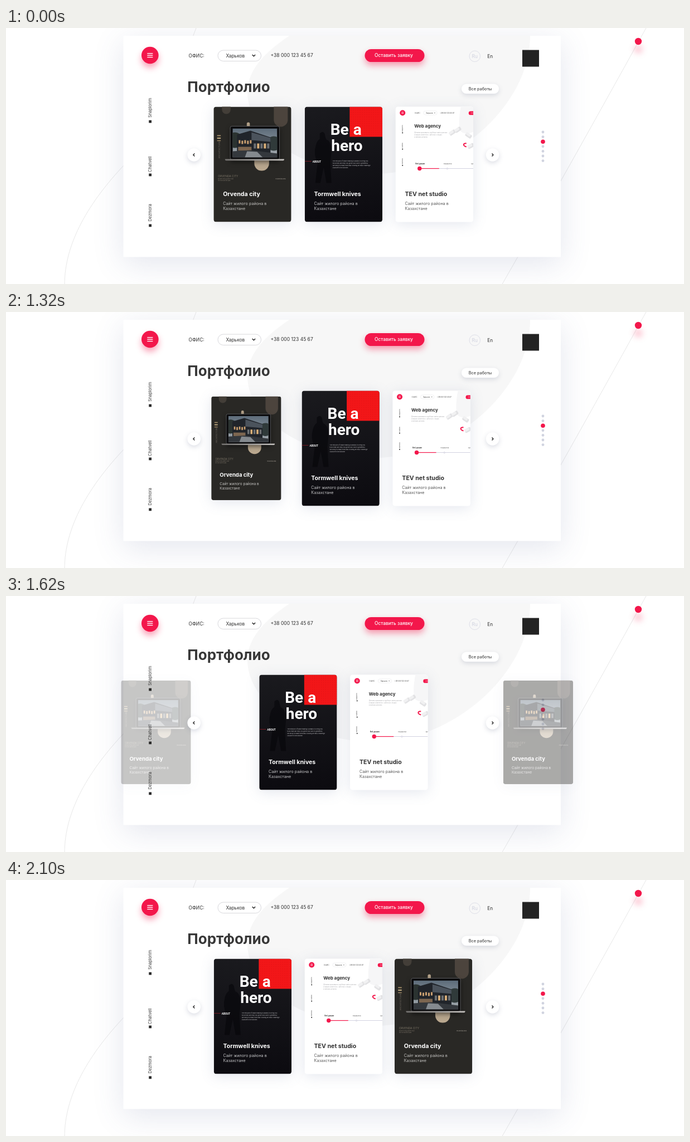
Recreate the animation shown at these times as an HTML page with a canvas. Size 1216 px wide and 460 px high, loop 3.6 s.

```html
<!DOCTYPE html>
<html lang="ru">
<head>
<meta charset="utf-8">
<title>Портфолио</title>
<style>
html, body { margin: 0; width: 100%; height: 100%; overflow: hidden; background: #fff; }
canvas { display: block; width: 1216px; height: 460px; }
</style>
</head>
<body>
<canvas id="stage"></canvas>
<script>
const W = 1216, H = 460, LOOP = 3600, STEP = 30;
const CARD_W = 139.3, CARD_H = 207, CARD_Y = 245;
const RED = '#f3174b', INK = '#2f2f2f', PHONE = '+38 000 123 45 67';
const dpr = window.devicePixelRatio || 1;

function setup(canvas) {
  canvas.width = W * dpr;
  canvas.height = H * dpr;
  const c = canvas.getContext('2d');
  c.scale(dpr, dpr);
  return c;
}
const main = setup(document.getElementById('stage'));
const layer = setup(document.createElement('canvas'));
let g = main;

// Drawing helpers
function text(s, x, y, size, color, weight = 400, font = 'Inter', align = 'left') {
  g.font = `${weight} ${size}px ${font}, sans-serif`;
  g.fillStyle = color;
  g.textAlign = align;
  g.fillText(s, x, y);
}
function vtext(s, x, y, size, color) {
  g.save();
  g.translate(x, y);
  g.rotate(-Math.PI / 2);
  text(s, 0, 0, size, color);
  g.restore();
}
function rect(x, y, w, h, color) {
  g.fillStyle = color;
  g.fillRect(x, y, w, h);
}
function box(x, y, w, h, r, color) {
  g.beginPath();
  g.roundRect(x, y, w, h, r);
  g.fillStyle = color;
  g.fill();
}
function outline(x, y, w, h, r, color, width = 1) {
  g.beginPath();
  g.roundRect(x, y, w, h, r);
  g.strokeStyle = color;
  g.lineWidth = width;
  g.stroke();
}
function disc(x, y, r, color) {
  g.beginPath();
  g.arc(x, y, r, 0, Math.PI * 2);
  g.fillStyle = color;
  g.fill();
}
function poly(points, color) {
  g.beginPath();
  for (let i = 0; i < points.length; i += 2) g.lineTo(points[i], points[i + 1]);
  g.closePath();
  g.fillStyle = color;
  g.fill();
}
function curve(d, color, width = 1) {
  g.strokeStyle = color;
  g.lineWidth = width;
  g.stroke(new Path2D(d));
}
function shadowed(color, blur, dy, draw) {
  g.save();
  g.shadowColor = color;
  g.shadowBlur = blur * dpr;
  g.shadowOffsetY = dy * dpr;
  draw();
  g.restore();
}
function fade(x0, y0, x1, y1, a, b) {
  const f = g.createLinearGradient(x0, y0, x1, y1);
  f.addColorStop(0, a);
  f.addColorStop(1, b);
  return f;
}

// Page behind the cards
function page() {
  rect(0, 0, W, H, '#fff');
  curve('M341 0 L335 16 M212 246 C150 312 105 385 105 462', '#e8e8e8');
  curve('M1148 0 C1075 132 990 285 889 462', '#e8e8e8');
  shadowed('rgba(243,23,75,.35)', 12, 14, () => disc(1134, 24, 6.2, RED));
  shadowed('rgba(75,90,140,.15)', 52, 12, () => rect(210.5, 14, 784.5, 397.5, '#fff'));
  g.fillStyle = '#f7f7f7';
  g.fill(new Path2D('M508 14 C470 40 433 72 433 115 C433 195 540 262 662 262 C800 262 940 140 940 14 Z'));

  shadowed('rgba(243,23,75,.4)', 12, 7, () => disc(258.3, 49, 15.3, RED));
  for (const y of [45, 48.4, 51.8]) rect(253.3, y, 10, 1.4, '#fff');

  text('ОФИС:', 327.5, 52.8, 8.4, INK);
  box(380, 40, 77.5, 19.5, 9.7, '#fff');
  outline(380, 40, 77.5, 19.5, 9.7, '#d8d8dc');
  text('Харьков', 394.5, 52.6, 8.4, INK);
  curve('M441.7 48 L444.4 50.7 L447.1 48', '#222', 1.5);
  text(PHONE, 474.5, 52.4, 8.5, INK);
  shadowed('rgba(243,23,75,.42)', 12, 6, () => box(643.5, 38, 107, 23, 11.5, RED));
  text('Оставить заявку', 695.5, 52.4, 8.4, '#fff', 500, 'Inter', 'center');
  outline(831, 41, 19.5, 19.5, 9.75, '#dedfe8');
  text('Ru', 840.7, 53.7, 8.4, '#cfd0de', 400, 'Inter', 'center');
  text('En', 868.2, 53.7, 8.4, INK, 400, 'Inter', 'center');
  rect(926, 39.5, 30, 30, '#232323');

  text('Портфолио', 325.3, 115, 26, '#383838', 700);
  shadowed('rgba(90,100,130,.2)', 9, 3, () => box(817, 100.5, 67, 17.5, 8.7, '#fff'));
  text('Все работы', 850.5, 112, 7.3, INK, 400, 'Inter', 'center');

  [['Snaplorim', 161], ['Chatvell', 259], ['Dezmora', 347.5]].forEach(([s, y], i) => {
    vtext(s, 261.2, y, 7.4, '#3a3a3a');
    rect(256.2, [165.7, 261.5, 352.5][i], 4.8, 4.8, '#2b2b2b');
  });
  for (let i = 0; i < 7; i++) {
    const on = i === 2;
    disc(963, 187 + i * 8.6, on ? 3.8 : 2.4, on ? RED : '#d0d3df');
  }
}

function arrow(x, dir) {
  shadowed('rgba(90,100,130,.22)', 9, 3, () => disc(x, 228, 11.8, '#fff'));
  curve(`M${x - dir * 1.1} 225.6 l${dir * 2.4} 2.4 l${-dir * 2.4} 2.4`, '#222', 1.4);
}

// Card artwork, in card coordinates
function caption(title, color, sub) {
  text(title, 16.8, 160.2, 10.6, color, 700);
  text('Сайт жилого района в', 16.8, 176.4, 7.2, sub);
  text('Казахстане', 16.8, 185.7, 7.2, sub);
}

function laptop() {
  shadowed('rgba(0,0,0,.55)', 8, 4, () => box(29.8, 35, 88.4, 60, 3, '#0b0b0d'));
  outline(29.8, 35, 88.4, 60, 3, '#77777a', .7);
  g.save();
  g.beginPath();
  g.rect(34, 39, 80, 52);
  g.clip();
  rect(34, 39, 80, 52, fade(0, 39, 0, 91, '#5d6c7a', '#a5abb0'));
  disc(38, 60, 14, '#2b3331');
  disc(108, 66, 13, '#303a3a');
  poly([42, 50, 66, 43, 102, 55, 102, 84, 42, 80], '#20242a');
  poly([68, 46, 102, 56, 102, 63, 68, 60], '#4b535c');
  for (let i = 0; i < 5; i++) {
    rect(45 + i * 5, 60 + (i % 2), 3, 6, '#c99f70');
    rect(72 + i * 6, 66, 4, 9, i % 2 ? '#d8ae78' : '#6d7073');
  }
  rect(44, 72, 24, 7, '#7d6650');
  poly([34, 80, 66, 78, 114, 84, 114, 91, 34, 91], '#34383d');
  poly([60, 80, 78, 81, 88, 91, 56, 91], '#858a8f');
  g.restore();
  box(20.5, 94, 106, 2.8, [0, 0, 2, 2], fade(20, 0, 126, 0, '#73716f', '#c5c2bf'));
}

function cityCard() {
  rect(0, 0, CARD_W, CARD_H, '#292825');
  box(15, -10, 15.5, 23, 7.7, '#433e38');
  box(108, -12, 25, 48, 12.5, '#4c443d');
  box(59.5, 28, 5.5, 20, 2.7, '#b3a188');
  box(73, 78, 26.5, 37, 13.2, '#b9a78e');
  laptop();
  ['#a6906b', '#d5bc8e', '#8d7a5c'].forEach((c, i) => rect(6.3, 51 + i * 4.5, 6.5, 1.8, c));
  vtext('ARCHITECTURE', 12, 93, 4, '#69645b');
  text('ORVENDA CITY', 8, 126.6, 4.9, '#938a79', 300);
  text('Modern living quarter near', 8, 130.6, 2.2, '#857d70');
  text('the river and the park', 8, 133, 2.2, '#857d70');
  text('residential area', 111, 130.2, 2.5, '#aaa399');
  caption('Orvenda city', '#fff', '#c7c6c4');
}

function knifeCard() {
  rect(0, 0, CARD_W, CARD_H, fade(0, 0, 0, CARD_H, '#1a1a1e', '#0c0b10'));
  g.fillStyle = 'rgba(5,5,8,.55)';
  g.fill(new Path2D('M27 48 q6 -6 9 1 q1 7 3 10 q9 3 9 22 l-2 20 l2 36 h-9 l-5 -28 l-6 28 h-9 l4 -36 q-8 -16 -3 -32 q2 -8 7 -11 z'));
  rect(80.6, 0, CARD_W - 80.6, 54, '#f21618');
  for (let x = 83; x < CARD_W; x += 4)
    for (let y = 2; y < 54; y += 4) rect(x, y, .7, .7, 'rgba(120,0,20,.3)');
  text('Be', 46, 50.6, 28, '#fff', 700, 'Roboto');
  text('a', 87, 50.6, 28, '#fff', 700, 'Roboto');
  text('hero', 47.5, 79.3, 28, '#fff', 700, 'Roboto');
  rect(0, 97.5, 12, .7, '#9b1b27');
  text('ABOUT', 14, 100, 4.7, '#fff', 700, 'Roboto');
  ['The mission of blade making is always to bring you', 'tools that can help you grow your skill to greatness',
    'We work to make everyday cooking an easy challenge', 'yourself in the kitchen'
  ].forEach((s, i) => text(s, 50, 98 + i * 4.3, 2.65, '#c4c4c7'));
  caption('Tormwell knives', '#fff', '#c9c9cb');
}

function studioCard() {
  rect(0, 0, CARD_W, CARD_H, '#fff');
  g.fillStyle = '#f6f6f7';
  g.fill(new Path2D('M117 0 Q112 26 115 42 Q122 52 140 45 V0 Z'));
  for (const [x, y, a] of [[101, 47, -.6], [111, 42, -.6], [130, 51, .6], [134, 71, -.5]]) {
    g.save();
    g.translate(x, y);
    g.rotate(a);
    box(-5, -3.5, 12, 7, 2, '#e2e2e4');
    box(-5, -3.5, 9, 4.5, 1.5, '#f1f1f2');
    g.restore();
  }
  curve('M127 66 C121 65 120 70 127 72', RED, 2);
  disc(12.5, 11, 5, RED);
  for (let i = 0; i < 3; i++) rect(10.6, 9.1 + i * 1.5, 3.8, .6, '#fff');
  text('ОФИС:', 34, 12.2, 3.2, '#555');
  outline(50, 7.5, 24.5, 7, 3.5, '#e2e2e6', .5);
  text('Харьков', 54.5, 12.1, 3, '#444');
  curve('M69 10.6 l1 1 l1 -1', '#333', .6);
  text(PHONE, 79.5, 12.1, 2.9, '#444');
  box(131, 8, 30, 6.8, 3.4, RED);
  rect(135, 11, 4.3, .7, '#ffc9d5');
  text('Web agency', 33.5, 37.5, 7.9, '#333', 700);
  ['Делаем красивые и удобные сайты для вас', 'и ваших клиентов с заботой о людях',
    'и мелких деталях'].forEach((s, i) => text(s, 33.5, 47.3 + i * 4, 2.75, '#a9a9ad'));
  ['Snaplorim', 'Chatvell', 'Dezmora'].forEach((s, i) => {
    vtext(s, 13.2, 45 + i * 29.3, 2.5, '#444');
    rect(11.6, 46 + i * 29.3, 1.7, 1.7, '#222');
  });
  text('Веб-дизайн', 35.8, 103.8, 2.8, '#222', 700);
  text('Разработка', 86, 103.8, 2.6, '#555');
  text('Брендинг', 135.5, 103.8, 2.6, '#555');
  rect(43, 110.5, CARD_W - 43, 1, '#d3d2e0');
  rect(43, 110.4, 35, 1.2, RED);
  disc(43, 111, 3.7, RED);
  disc(92.7, 111, 1.5, '#c9c8d8');
  disc(92.7, 111, .8, '#fff');
  caption('TEV net studio', '#333', '#555');
}

function place(art, cx, scale = 1) {
  g.save();
  g.translate(cx, CARD_Y);
  g.scale(scale, scale);
  g.translate(-CARD_W / 2, -CARD_H / 2);
  shadowed('rgba(95,115,155,.17)', 24, 4, () => box(0, 0, CARD_W, CARD_H, 4.5, '#fff'));
  g.beginPath();
  g.roundRect(0, 0, CARD_W, CARD_H, 4.5);
  g.clip();
  art();
  g.restore();
}
function card(art, cx, scale = 1, alpha = 1) {
  if (alpha >= 1) return place(art, cx, scale);
  if (alpha <= 0) return;
  g = layer;
  g.clearRect(0, 0, W, H);
  place(art, cx, scale);
  g = main;
  g.globalAlpha = alpha;
  g.drawImage(layer.canvas, 0, 0, W, H);
  g.globalAlpha = 1;
}

// Motion
const part = (t, a, b) => Math.min(1, Math.max(0, (t - a) / (b - a)));
const smooth = p => p * p * (3 - 2 * p);
const HALF = 81.5, MID = 1620;

function slide(t) {
  return t < MID
    ? HALF * part(t, 1150, MID) ** 2.7
    : HALF * (2 - (1 - part(t, MID, 1980)) ** 3.7);
}

function render(t) {
  const moved = slide(t);
  page();
  card(knifeCard, 605.4 - moved);
  card(studioCard, 768.4 - moved);
  if (t <= MID) {
    const shrink = 1 - .1 * smooth(part(t, 915, 1165));
    card(cityCard, 442 - 173 * moved / HALF, shrink, 1 - part(t, 1327, 1723));
  }
  if (t > 1530) {
    const grow = .9 + .1 * smooth(part(t, 1860, 2100));
    card(cityCard, 766.6 + 2.305 * (2 * HALF - moved), grow, part(t, 1522, 1772));
  }
  arrow(337.2, -1);
  arrow(872.6, 1);
}

const start = performance.now();
function tick() {
  const t = (performance.now() - start) % LOOP;
  render(Math.floor(t / STEP) * STEP);
  requestAnimationFrame(tick);
}
tick();
</script>
</body>
</html>
```
